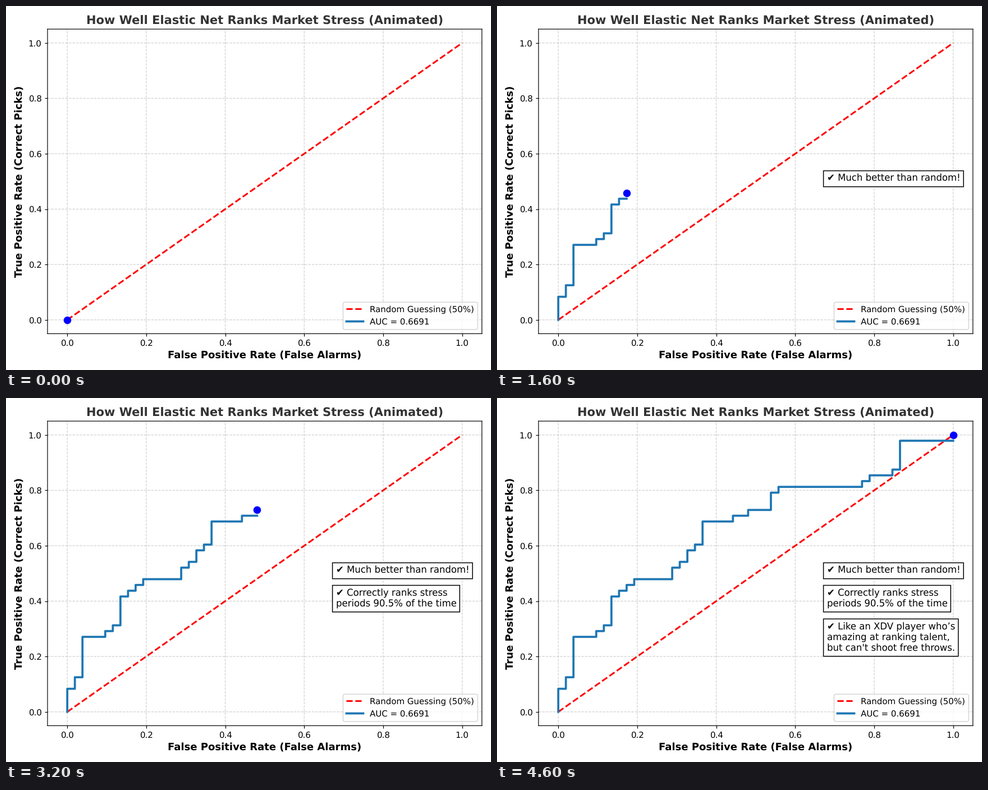
A matplotlib script for the animation above (4700 ms loop, 864 px wide and 648 px high).

```python
import numpy as np
import matplotlib.pyplot as plt
from matplotlib.animation import FuncAnimation

# Unhinted text and unsnapped paths keep the layout at its true sub-pixel size
plt.rcParams.update({
    "font.family": "DejaVu Sans",
    "text.hinting": "none",
    "path.snap": False,
})

NEG, POS = 52, 48  # class sizes behind the ROC staircase

# Alternating moves: up by UPS[k], then right by RIGHTS[k]
RIGHTS = [1, 1, 3, 1, 1, 1, 1, 1, 5, 1, 1, 1, 1, 4, 2, 3, 1, 11, 1, 3, 1, 7]
UPS = [4, 2, 7, 1, 1, 5, 1, 1, 1, 2, 1, 2, 1, 4, 1, 1, 3, 1, 1, 1, 1, 5]


def roc_corners():
    pts = [(0, 0), (0, 1)]
    x = y = 0
    for up, right in zip(UPS, RIGHTS):
        y += up
        pts.append((x, y))
        x += right
        pts.append((x, y))
    pts.append((NEG, POS))
    return np.array(pts) / (NEG, POS)


fpr, tpr = roc_corners().T
FRAMES = len(fpr)

fig, ax = plt.subplots(figsize=(8, 6), dpi=108)
ax.plot([0, 1], [0, 1], "r--", lw=2, label="Random Guessing (50%)")
line, = ax.plot([], [], color="tab:blue", lw=2.5, label="AUC = 0.6691")
dot, = ax.plot([], [], "bo", ms=8)

ax.set_xlim(-0.05, 1.05)
ax.set_ylim(-0.05, 1.05)
ax.set_title("How Well Elastic Net Ranks Market Stress (Animated)",
             fontsize=14, fontweight="bold", color="#333333")
ax.set_xlabel("False Positive Rate (False Alarms)", fontsize=12, fontweight="bold")
ax.set_ylabel("True Positive Rate (Correct Picks)", fontsize=12, fontweight="bold")
ax.grid(True, linestyle="--", alpha=0.6)
ax.legend(loc="lower right", fontsize=10)


def note(y, text):
    return ax.text(0.68, y, text, fontsize=11, visible=False,
                   bbox=dict(facecolor="white", edgecolor="black"))


notes = [
    note(0.50, "✔ Much better than random!"),
    note(0.38, "✔ Correctly ranks stress\nperiods 90.5% of the time"),
    note(0.22, "✔ Like an XDV player who’s\namazing at ranking talent,\n"
               "but can't shoot free throws."),
]

fig.tight_layout()


def update(i):
    line.set_data(fpr[:i], tpr[:i])
    dot.set_data([fpr[i]], [tpr[i]])
    # One note per elapsed quarter of the run
    for k, box in enumerate(notes, 1):
        box.set_visible(i > FRAMES * k / 4)
    return [line, dot, *notes]


anim = FuncAnimation(fig, update, frames=FRAMES, interval=100,
                     repeat=True, repeat_delay=0, blit=False)
plt.show()
```
